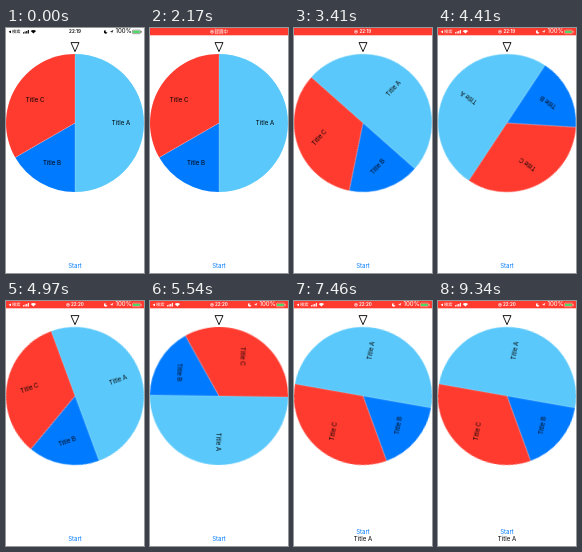
Write an HTML page that moves like this. It is 138 px wide and 245 px high and loops after 9390 ms.

```html
<!DOCTYPE html>
<html lang="ja">
<head>
<meta charset="utf-8">
<title>Roulette</title>
<style>
  html, body { margin: 0; width: 100%; height: 100%; overflow: hidden; background: #fff; }
  svg { display: block; width: 100%; height: 100%; }
  text { font: 6.1px Inter, "Liberation Sans", sans-serif; text-anchor: middle; }
  .status text { font-size: 4.5px; font-family: Inter, "Noto Sans CJK JP", "Noto Sans CJK", sans-serif; fill: currentColor; }
  .status .clock { font-weight: 600; }
  .dark { color: #000; }
  .light { color: #fff; }
  #wheel { transform-origin: 69px 95px; }
  #start { fill: #007aff; }
</style>
</head>
<body>
<svg viewBox="0 0 138 245" preserveAspectRatio="none">
  <defs>
    <g id="sides" fill="currentColor">
      <path d="M2.6 3.8 5 2.4V5.2Z"/>
      <text x="10.3" y="5.4" style="font-size:4.2px">検索</text>
      <path d="M17 4.2h1.1v1.2H17zM18.6 3.6h1.1v1.8h-1.1zM20.2 2.9h1.1v2.5h-1.1zM21.8 2.1h1.1v3.3h-1.1z"/>
      <path d="M27.4 5.6 24.7 2.9Q27.4 .9 30.1 2.9Z"/>
      <path d="M99.6 1.9A1.9 1.9 0 1 0 101.5 4.6 1.9 1.9 0 0 1 99.6 1.9Z"/>
      <path d="M107.4 2 105.8 5.6V3.7H103.8Z"/>
      <text x="117.6" y="5.4">100%</text>
      <rect x="126.4" y="2.1" width="8" height="3.6" rx=".9" fill="none" stroke="currentColor" stroke-width=".4"/>
      <rect x="127" y="2.7" width="6.8" height="2.4" rx=".4" fill="#4cd964"/>
      <rect x="134.9" y="3.2" width=".6" height="1.4"/>
    </g>
    <g id="rec">
      <circle cx="62" cy="3.8" r="1.6" fill="none" stroke="currentColor" stroke-width=".5"/>
      <circle cx="62" cy="3.8" r=".8" fill="currentColor"/>
    </g>
  </defs>

  <g class="status dark" id="idle">
    <use href="#sides"/>
    <text class="clock" x="69" y="5.4">22:19</text>
  </g>
  <rect id="bar" width="138" height="7.3" fill="#ff3b30"/>
  <g class="status light">
    <g id="recording"><use href="#rec"/><text x="71.3" y="5.4">録画中</text></g>
    <g id="early"><use href="#rec"/><text class="clock" x="71.3" y="5.4">22:19</text></g>
    <g id="late"><use href="#rec"/><text class="clock" x="71.3" y="5.4">22:20</text></g>
    <g id="icons"><use href="#sides"/></g>
  </g>

  <path d="M65 14.6H73L69 23.6Z" fill="#fff" stroke="#000" stroke-width=".9"/>
  <g id="wheel"></g>
  <text id="start" x="69" y="240.2">Start</text>
  <text id="result" x="69" y="240.2">Title A</text>
</svg>
<script>
  const LOOP = 9390, SPIN = 2400, STOP = 7400;
  const CX = 69, CY = 95, R = 69, LABEL_R = 46;
  const $ = id => document.getElementById(id);

  // Slices run clockwise from the top, angles in degrees.
  const slices = [
    ["Title A", 0, 180, "#5ac8fa"],
    ["Title B", 180, 240, "#007aff"],
    ["Title C", 240, 360, "#ff3b30"],
  ];
  const at = (deg, r) => {
    const a = (deg - 90) * Math.PI / 180;
    return [CX + r * Math.cos(a), CY + r * Math.sin(a)];
  };
  const sector = ([, from, to, color]) =>
    `<path d="M${CX} ${CY}L${at(from, R)}A${R} ${R} 0 0 1 ${at(to, R)}Z" fill="${color}"/>`;
  const divider = ([, from]) =>
    `<path d="M${CX} ${CY}L${at(from, R)}" stroke="#fff" stroke-width=".35" stroke-opacity=".6"/>`;
  const label = ([name, from, to]) => {
    const [x, y] = at((from + to) / 2, LABEL_R);
    return `<text x="${x}" y="${y + 2.2}">${name}</text>`;
  };
  $("wheel").innerHTML = [sector, divider, label].map(f => slices.map(f).join("")).join("");

  // Steps are [ms, value, easing to the next step].
  const play = (id, prop, steps) => {
    const all = [[0, steps[0][1]], ...steps, [LOOP, steps.at(-1)[1]]];
    $(id).animate(
      all.map(([ms, value, easing = "linear"]) => ({ offset: ms / LOOP, [prop]: value, easing })),
      { duration: LOOP, iterations: Infinity });
  };
  const fade = (id, ...steps) => play(id, "opacity", steps);
  const HOLD = "steps(1, end)";

  fade("idle", [20, 1], [300, 0]);
  fade("bar", [20, 0], [350, 1]);
  fade("recording", [150, 0], [450, 1], [2900, 1], [3100, 0]);
  fade("early", [3050, 0], [3250, 1], [4900, 1, HOLD], [4910, 0]);
  fade("late", [4900, 0, HOLD], [4910, 1]);
  fade("icons", [3420, 0], [3700, 1]);

  play("wheel", "transform", [
    [SPIN, "rotate(0deg)", "cubic-bezier(0, 0, .58, 1)"],
    [STOP, "rotate(1000deg)"],
  ]);
  fade("start", [2220, 1], [2270, .3], [2400, .3], [2650, 1]);
  play("start", "transform", [
    [STOP, "translateY(0px)", HOLD],
    [STOP + 10, "translateY(-7.6px)"],
  ]);
  fade("result", [STOP, 0, HOLD], [STOP + 10, 1]);
</script>
</body>
</html>
```
